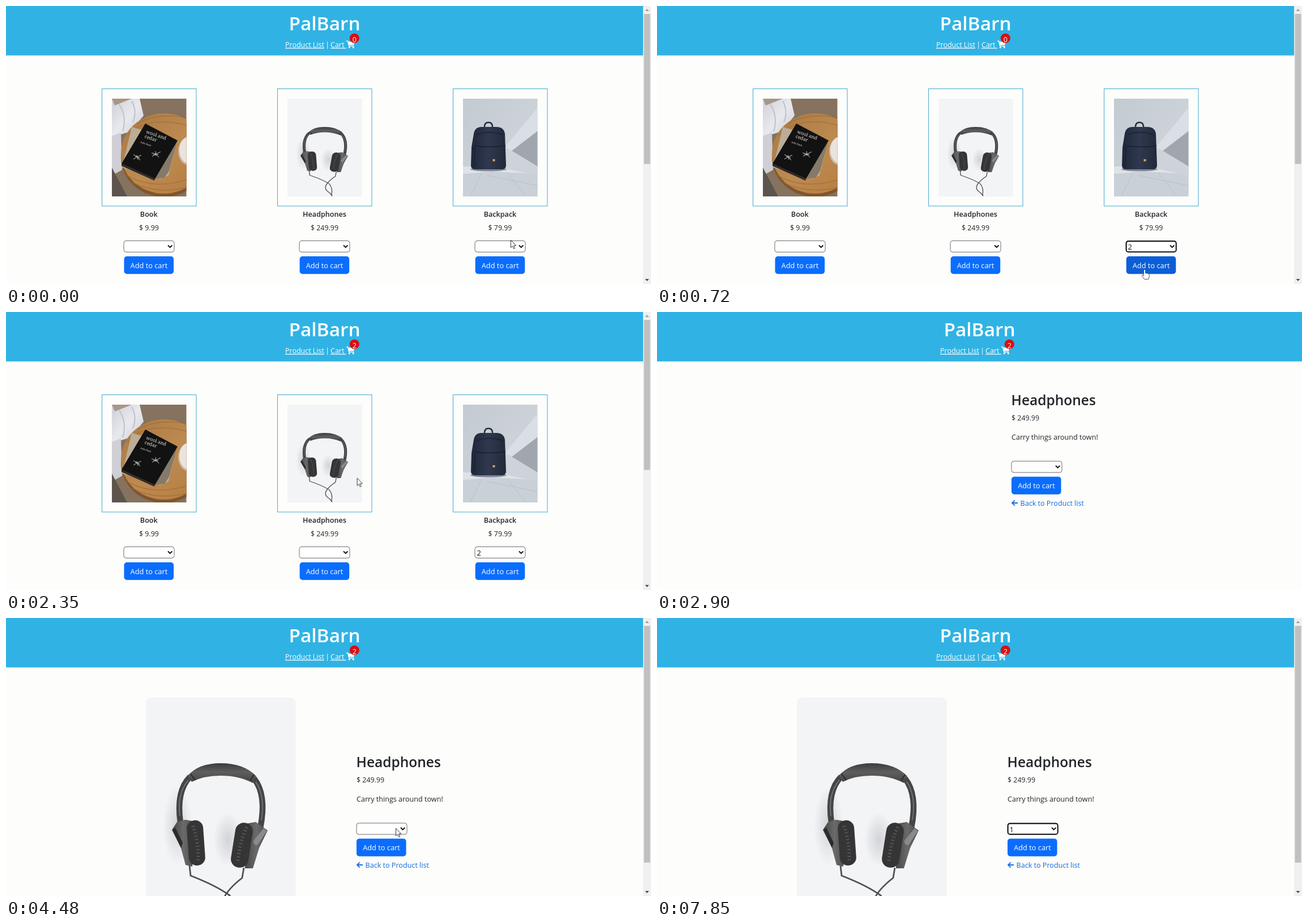
These frames come from a looping animation (1139x492 px, 8000 ms). An HTML page:

```html
<!DOCTYPE html>
<html lang="en">
<head>
<meta charset="utf-8">
<title>PalBarn</title>
<style>
html, body { margin: 0; width: 100%; height: 100%; overflow: hidden; background: #fdfdfb; }
svg.stage { display: block; width: 100vw; height: 100vh; }
text { font: 12.6px "Open Sans", "Noto Sans", sans-serif; fill: #212529; }
.mid { text-anchor: middle; }
.bold { font-weight: 600; }
.head text { fill: #fff; }
.head .brand { font-size: 33.4px; font-weight: 600; }
.link { text-decoration: underline; font-size: 12.5px; }
.price { font-size: 12.4px; }
.h2 { font-size: 24.5px; font-weight: 600; }
.btn { fill: #0a6dfd; }
.btn-label { font-size: 12.8px; fill: #fff; }
.value { font-size: 13px; fill: #111; }
.box { fill: #fff; stroke: #6c6c6c; }
.ring { fill: none; stroke: #111; stroke-width: 1.9; }
.serif { font-family: "Noto Serif", serif; fill: #e9e4dc; }

/* hard switches */
.list, .full, .img, .zero, .two, .ring2, .val2, .hover, .ring1, .val1,
.arrow, .hand, .shift, .info, .bar { animation: 8s step-end infinite; }
.list { animation-name: list; }
.full { animation-name: full; }
.img { animation-name: img; }
.bar { animation-name: bar; }
.shift { animation-name: shift; }
.info { animation-name: info; }
.zero { animation-name: zero; }
.two { animation-name: two; }
.ring2 { animation-name: ring2; }
.val2 { animation-name: val2; }
.hover { animation-name: hover; }
.ring1 { animation-name: ring1; }
.val1 { animation-name: val1; }
.arrow { animation-name: arrow; }
.hand { animation-name: hand; }
@keyframes list { 0% { opacity: 1 } 36.25%, 100% { opacity: 0 } }
@keyframes full { 0% { opacity: 0 } 36.25%, 100% { opacity: 1 } }
@keyframes img { 0% { opacity: 0 } 40.375%, 100% { opacity: 1 } }
@keyframes bar { 0% { opacity: 1 } 36.25% { opacity: 0 } 40.375%, 100% { opacity: 1 } }
@keyframes shift { 0% { transform: none } 36.25% { transform: translate(7px, 0) } 40.375%, 100% { transform: none } }
@keyframes info { 0% { transform: none } 36.25% { transform: translate(7px, -99px) } 40.375%, 100% { transform: none } }
@keyframes zero { 0% { opacity: 1 } 10.875%, 100% { opacity: 0 } }
@keyframes two { 0% { opacity: 0 } 10.875%, 100% { opacity: 1 } }
@keyframes ring2 { 0% { opacity: 0 } 3.5% { opacity: 1 } 10.875%, 100% { opacity: 0 } }
@keyframes val2 { 0% { opacity: 0 } 3.5%, 100% { opacity: 1 } }
@keyframes hover { 0% { fill: #0a6dfd } 7.6% { fill: #0b5ed7 } 27.3%, 100% { fill: #0a6dfd } }
@keyframes ring1 { 0% { opacity: 0 } 57.875%, 100% { opacity: 1 } }
@keyframes val1 { 0% { opacity: 0 } 64.5%, 100% { opacity: 1 } }
@keyframes arrow {
  0% { opacity: 1 } 7.6% { opacity: 0 } 27.3% { opacity: 1 } 29.75% { opacity: 0 }
  48.25% { opacity: 1 } 66.25%, 100% { opacity: 0 }
}
@keyframes hand {
  0% { opacity: 0 } 7.6% { opacity: 1 } 27.3% { opacity: 0 } 29.75% { opacity: 1 } 36.25%, 100% { opacity: 0 }
}

.pointer { animation: pointer 8s linear infinite; }
@keyframes pointer {
  0%, 1% { transform: translate(891px, 414px) }
  3% { transform: translate(866px, 426px) }
  5% { transform: translate(849px, 422px) }
  6% { transform: translate(851px, 426px) }
  9%, 13.5% { transform: translate(860px, 466px) }
  16.25% { transform: translate(858px, 470px) }
  26.5% { transform: translate(858px, 470px); animation-timing-function: ease-in }
  29.375% { transform: translate(620px, 294px); animation-timing-function: ease-out }
  31.5%, 36.25% { transform: translate(580px, 258px) }
  48.25% { transform: translate(600px, 330px); animation-timing-function: ease-out }
  56%, 64.5% { transform: translate(688px, 372px) }
  66.25%, 100% { transform: translate(664px, 388px) }
}
</style>
</head>
<body>
<svg class="stage" viewBox="0 0 1139 492" preserveAspectRatio="none">
<defs>
  <linearGradient id="wood" x1="0" y1="0" x2="1" y2="1">
    <stop offset="0" stop-color="#a87843"/><stop offset=".5" stop-color="#bd8a50"/><stop offset="1" stop-color="#b57c40"/>
  </linearGradient>
  <linearGradient id="cloth" x1="0" y1="0" x2="1" y2="1">
    <stop offset="0" stop-color="#cfd0d6"/><stop offset=".5" stop-color="#e8e9ee"/><stop offset="1" stop-color="#cccdd4"/>
  </linearGradient>
  <linearGradient id="wall" x1="0" y1="0" x2="1" y2="1">
    <stop offset="0" stop-color="#c3cad1"/><stop offset="1" stop-color="#d3d9de"/>
  </linearGradient>
  <linearGradient id="pack" x1="0" x2="1">
    <stop offset="0" stop-color="#20273a"/><stop offset=".5" stop-color="#2f384e"/><stop offset="1" stop-color="#222939"/>
  </linearGradient>
  <linearGradient id="pad" x1="0" y1="0" x2="0" y2="1">
    <stop offset="0" stop-color="#3c3c3c"/><stop offset=".45" stop-color="#5e5e5e"/><stop offset="1" stop-color="#424242"/>
  </linearGradient>
  <linearGradient id="cup" x1="0" x2="1">
    <stop offset="0" stop-color="#464647"/><stop offset=".5" stop-color="#6a6a6b"/><stop offset="1" stop-color="#4a4a4a"/>
  </linearGradient>
  <radialGradient id="shade">
    <stop offset="0" stop-color="#a9abb2" stop-opacity=".45"/><stop offset="1" stop-color="#a9abb2" stop-opacity="0"/>
  </radialGradient>
  <clipPath id="bookClip"><rect x="187" y="164" width="131.5" height="173"/></clipPath>
  <clipPath id="packClip"><rect x="807" y="164" width="131.5" height="173"/></clipPath>

  <symbol id="phones" viewBox="247 141 264 402" preserveAspectRatio="none">
    <ellipse cx="303" cy="368" rx="26" ry="70" fill="url(#shade)"/>
    <ellipse cx="392" cy="392" rx="26" ry="48" fill="url(#shade)"/>
    <g fill="none" stroke="#505050" stroke-width="2.8">
      <path d="M324 438L326 456Q372 474 395 491Q409 508 403 541"/>
      <path d="M420 442L417 460Q391 480 383 499Q377 515 396 528L406 541"/>
    </g>
    <g fill="none" stroke="#454546" stroke-width="10.5">
      <path d="M325 281Q300 306 308 362"/>
      <path d="M438 284Q461 313 449 372"/>
    </g>
    <g fill="none" stroke="#7d7d80" stroke-width="1.5">
      <path d="M322 287Q302 310 307 350"/>
      <path d="M441 290Q458 315 451 358"/>
    </g>
    <path d="M321 279Q340 257 379 257Q420 257 442 280L436 292Q411 279 379 279Q349 279 328 290Z" fill="url(#pad)"/>
    <path d="M326 276L334 287M438 277L431 288" stroke="#2a2a2a" stroke-width="2"/>
    <path d="M302 361L293 375L309 407L317 437L329 440L334 360L316 357Z" fill="url(#cup)"/>
    <path d="M294 375L309 407L312 398L299 371Z" fill="#2b2b2c"/>
    <path d="M441 361L462 376L447 407L436 443L422 443L424 364Z" fill="url(#cup)"/>
    <path d="M455 372L461 377L444 402Q436 402 437 394Z" fill="#8a8a8c"/>
    <rect x="321" y="358" width="29" height="80" rx="14" transform="rotate(-4 336 398)" fill="#353536"/>
    <rect x="401" y="362" width="31" height="80" rx="15" transform="rotate(9 416 402)" fill="#353536"/>
    <g stroke="#565658" stroke-width="6" stroke-dasharray="2 4" fill="none">
      <path d="M330 368Q341 398 339 432"/>
      <path d="M425 370Q412 398 409 434"/>
    </g>
  </symbol>

  <rect id="frame" x="169.5" y="146.5" width="166.5" height="207.5" fill="#fdfdfc" stroke="#45a9cf"/>
  <g id="picker">
    <rect class="box" x=".5" y=".5" width="89" height="20" rx="4"/>
    <path d="M78.5 8.5l3.7 3.7l3.7 -3.7" fill="none" stroke="#111" stroke-width="1.9"/>
  </g>
  <rect id="ring" x="1.2" y="1.2" width="88" height="19" rx="3.5"/>
  <rect id="button" width="87.6" height="31.3" rx="5"/>
</defs>

<rect width="1139" height="492" fill="#fdfdfb"/>

<g class="head">
  <rect width="1139" height="87.5" fill="#30b3e4"/>
  <g class="shift">
    <text class="mid brand" x="562.5" y="43">PalBarn</text>
    <text class="link" x="493" y="73">Product List</text>
    <text class="mid" x="567.6" y="73">|</text>
    <text class="link" x="573" y="73">Cart&#160;</text>
    <path d="M601 62h2.6l2.2 8.7h8.7" fill="none" stroke="#fff" stroke-width="1.5"/>
    <path d="M604 63h11.8l-1.7 6h-8.6z" fill="#fff"/>
    <circle cx="606.3" cy="73.3" r="1.5" fill="#fff"/>
    <circle cx="613.3" cy="73.3" r="1.5" fill="#fff"/>
    <circle cx="615.3" cy="57" r="8.6" fill="#d90f12"/>
    <text class="mid zero" x="615.3" y="64">0</text>
    <text class="mid two" x="615.3" y="64">2</text>
  </g>
</g>

<g class="list">
  <use href="#frame"/>
  <use href="#frame" x="310"/>
  <use href="#frame" x="620"/>

  <g clip-path="url(#bookClip)">
    <rect x="187" y="164" width="132" height="173" fill="#85725f"/>
    <path d="M187 164H236L243 194L220 222L187 232Z" fill="url(#cloth)"/>
    <path d="M187 164L192 176L222 164Z" fill="#a8968a"/>
    <path d="M200 174Q214 196 206 222M222 168Q232 186 224 206" fill="none" stroke="#bfc0c8" stroke-width="2"/>
    <path d="M187 230L203 224L205 290L187 300Z" fill="#cfcfd5"/>
    <path d="M187 286L214 337H187Z" fill="#5d544e"/>
    <ellipse cx="279" cy="267" rx="76" ry="71" fill="#80562c"/>
    <ellipse cx="279" cy="261" rx="76" ry="71" fill="url(#wood)"/>
    <g fill="none" stroke="#9a6a35" stroke-width="1.5" opacity=".6">
      <path d="M214 230Q250 190 330 214"/>
      <path d="M232 208Q270 186 330 200"/>
      <path d="M206 296Q260 330 330 304"/>
      <path d="M222 312Q270 336 330 318"/>
    </g>
    <ellipse cx="323" cy="257" rx="19" ry="25" fill="#c9b8a2"/>
    <ellipse cx="324" cy="255" rx="18" ry="24" fill="#e9e4de"/>
    <path d="M222 214L302 238L287 300L272 306L205 286Z" fill="#bbad96"/>
    <path d="M204 280L262 306L280 304L288 292L302 240Z" fill="#857a69"/>
    <path d="M246 208L303 238L263 306L204 279Z" fill="#121212"/>
    <path d="M204 279L263 306L262 309L204 283Z" fill="#2e2b28"/>
    <g transform="translate(247 225) rotate(19)">
      <text class="serif" style="font-size:8.4px">wool and</text>
      <text class="serif" y="8.5" style="font-size:8.4px">cedar</text>
    </g>
    <text class="serif" style="font-size:4.4px" transform="translate(237 242) rotate(19)">nola fenn</text>
    <g fill="none" stroke="#c9c4ba">
      <path d="M225 263l7 4l7 -3M225 271l7 -4l5 6M231 264l2 8M228 266l8 3"/>
      <path d="M257 260l8 2l8 -4M258 266l7 -4l5 6M264 257l1 8M260 263l9 0"/>
    </g>
  </g>

  <rect x="497" y="164" width="131.5" height="173" fill="#f3f4f5"/>
  <use href="#phones" x="497" y="164" width="131.5" height="173"/>

  <g clip-path="url(#packClip)">
    <rect x="807" y="164" width="132" height="173" fill="url(#wall)"/>
    <path d="M939 180L884 246V266L939 222Z" fill="#d9dfe4"/>
    <path d="M939 221L883 264V286H939Z" fill="#9fa6ae"/>
    <path d="M807 285H939V337H807Z" fill="#c9d0d7"/>
    <path d="M807 284H939V297L860 293L807 297Z" fill="#dfe3e7"/>
    <path d="M883 250L939 284V300L883 288Z" fill="#cdd3d9"/>
    <path d="M850 300L939 318M885 295L918 337M840 295L820 337" stroke="#b9c0c9" fill="none"/>
    <ellipse cx="852" cy="289" rx="32" ry="3.5" fill="#7f8797"/>
    <path d="M845 217Q844 206 852 206Q860 206 859 217" fill="none" stroke="#262e3f" stroke-width="2.5"/>
    <path d="M826 226Q828 214 840 214H866Q879 214 881 226L883 282Q883 289 876 289H828Q821 289 821 282L822 250Z" fill="url(#pack)"/>
    <path d="M826 247Q854 252 882 247M831 228Q854 219 877 228M828 250L827 285" fill="none" stroke="#182030" stroke-width="1.4"/>
    <rect x="859.5" y="271" width="4" height="4" fill="#c7a34e"/>
  </g>

  <text class="mid bold" x="252.3" y="373">Book</text>
  <text class="mid bold" x="562.5" y="373">Headphones</text>
  <text class="mid bold" x="872.5" y="373">Backpack</text>
  <text class="mid price" x="252.5" y="397">$ 9.99</text>
  <text class="mid price" x="562.5" y="397">$ 249.99</text>
  <text class="mid price" x="872.5" y="397">$ 79.99</text>

  <use href="#picker" x="207.5" y="415"/>
  <use href="#picker" x="517.5" y="415"/>
  <use href="#picker" x="827.5" y="415"/>
  <text class="value val2" x="831.5" y="430.5">2</text>
  <g class="ring2"><use class="ring" href="#ring" x="827.5" y="415"/></g>

  <use class="btn" href="#button" x="208.5" y="443"/>
  <use class="btn" href="#button" x="518.6" y="443"/>
  <use class="hover" href="#button" x="828.7" y="443"/>
  <text class="mid btn-label" x="252.4" y="463.5">Add to cart</text>
  <text class="mid btn-label" x="562.5" y="463.5">Add to cart</text>
  <text class="mid btn-label" x="872.6" y="463.5">Add to cart</text>
</g>

<g class="full">
  <g class="img">
    <rect x="247" y="141" width="264.5" height="402" rx="9" fill="#f3f4f6"/>
    <use href="#phones" x="247" y="141" width="264" height="402"/>
  </g>
  <g class="info">
    <text class="h2" x="618.5" y="264">Headphones</text>
    <text class="price" x="619" y="291">$ 249.99</text>
    <text x="619" y="325">Carry things around town!</text>
    <use href="#picker" x="618.5" y="362.5"/>
    <text class="value val1" x="622.5" y="378.5">1</text>
    <g class="ring1"><use class="ring" href="#ring" x="618.5" y="362.5"/></g>
    <use class="btn" href="#button" x="619" y="390.4"/>
    <text class="mid btn-label" x="663" y="411">Add to cart</text>
    <path d="M630 437H620M624.7 432.3L620 437L624.7 441.7" fill="none" stroke="#136bdf" stroke-width="1.8"/>
    <text x="634.5" y="441.5" style="fill:#136bdf">Back to Product list</text>
  </g>
</g>

<g class="bar">
  <rect x="1125" width="14" height="492" fill="#f0f0f0"/>
  <g class="list"><rect x="1126.5" y="14" width="11" height="265.5" fill="#c0c0c0"/></g>
  <g class="full"><rect x="1126.5" y="14" width="11" height="419" fill="#c0c0c0"/></g>
  <path d="M1128.5 9L1132 5L1135.5 9Z" fill="#a0a0a0"/>
  <path d="M1128.5 483L1132 487L1135.5 483Z" fill="#505050"/>
</g>

<g class="pointer">
  <path class="arrow" d="M.5 .3V13.6L3.5 10.8L5.6 15.6L7.7 14.7L5.6 10H9.8Z" fill="#fff" stroke="#222" stroke-width=".9"/>
  <path class="hand" d="M-.5 1Q1 -.6 2.5 1V7Q4 6 5 7.4Q6.6 6.6 7.4 8Q9.2 7.4 9.2 9.5V13L7.8 17.5H.6L-3.6 11.6Q-3.6 9.6 -1.8 10L-.5 11.4Z" fill="#fff" stroke="#444" stroke-width=".9"/>
</g>
</svg>
</body>
</html>
```
